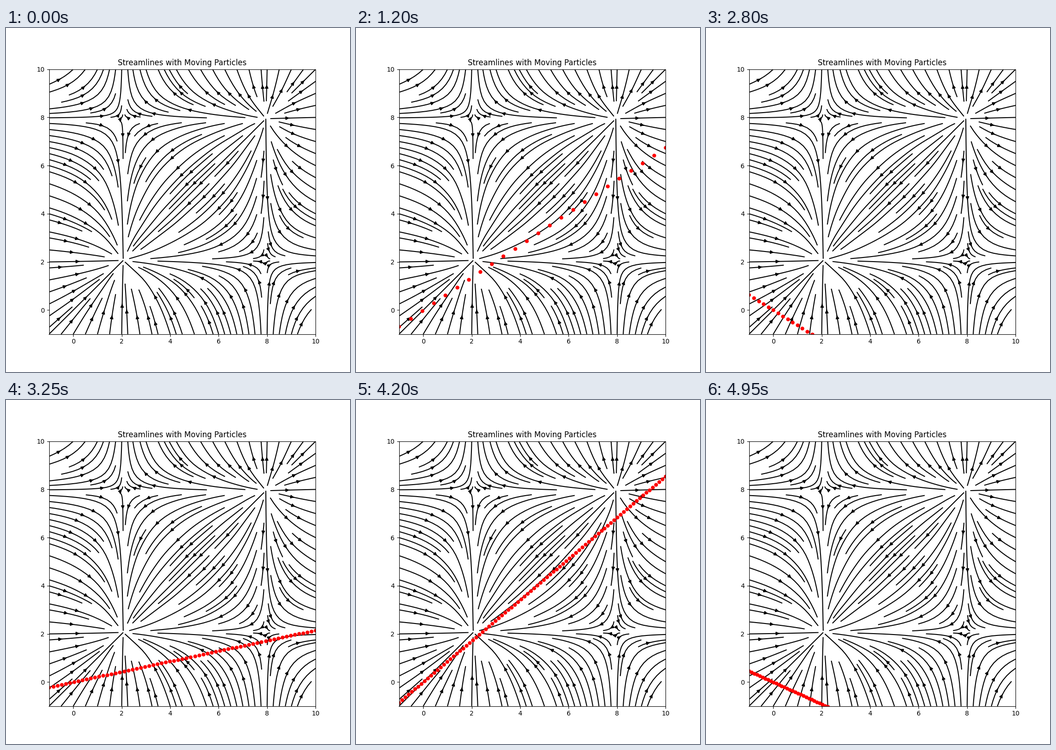
These frames come from a looping animation (748x748 px, 5 s). A matplotlib script:

```python
import numpy as np
import matplotlib.pyplot as plt
from matplotlib.animation import FuncAnimation

LOW, HIGH = -1, 10
FRAMES, INTERVAL = 100, 50


def flow(s):
    """Velocity along one axis, with zeros at 2 and 8."""
    return (s - 2) * (s - 8)


fig, ax = plt.subplots(figsize=(7.48, 7.48), dpi=100)

grid = np.linspace(LOW, HIGH, 10)
X, Y = np.meshgrid(grid, grid)
ax.streamplot(X, Y, flow(X), flow(Y), color="black", density=1.5)

particles, = ax.plot([], [], "ro", markersize=5)
ax.set_xlim(LOW, HIGH)
ax.set_ylim(LOW, HIGH)
ax.set_title("Streamlines with Moving Particles")


def update(frame):
    # One more particle each frame, on a line that swings about the origin
    x = np.linspace(LOW, HIGH, frame)
    particles.set_data(x, x * np.sin(0.1 * frame))
    return particles,


anim = FuncAnimation(fig, update, frames=FRAMES, interval=INTERVAL,
                     repeat=True, repeat_delay=0)
plt.show()
```
